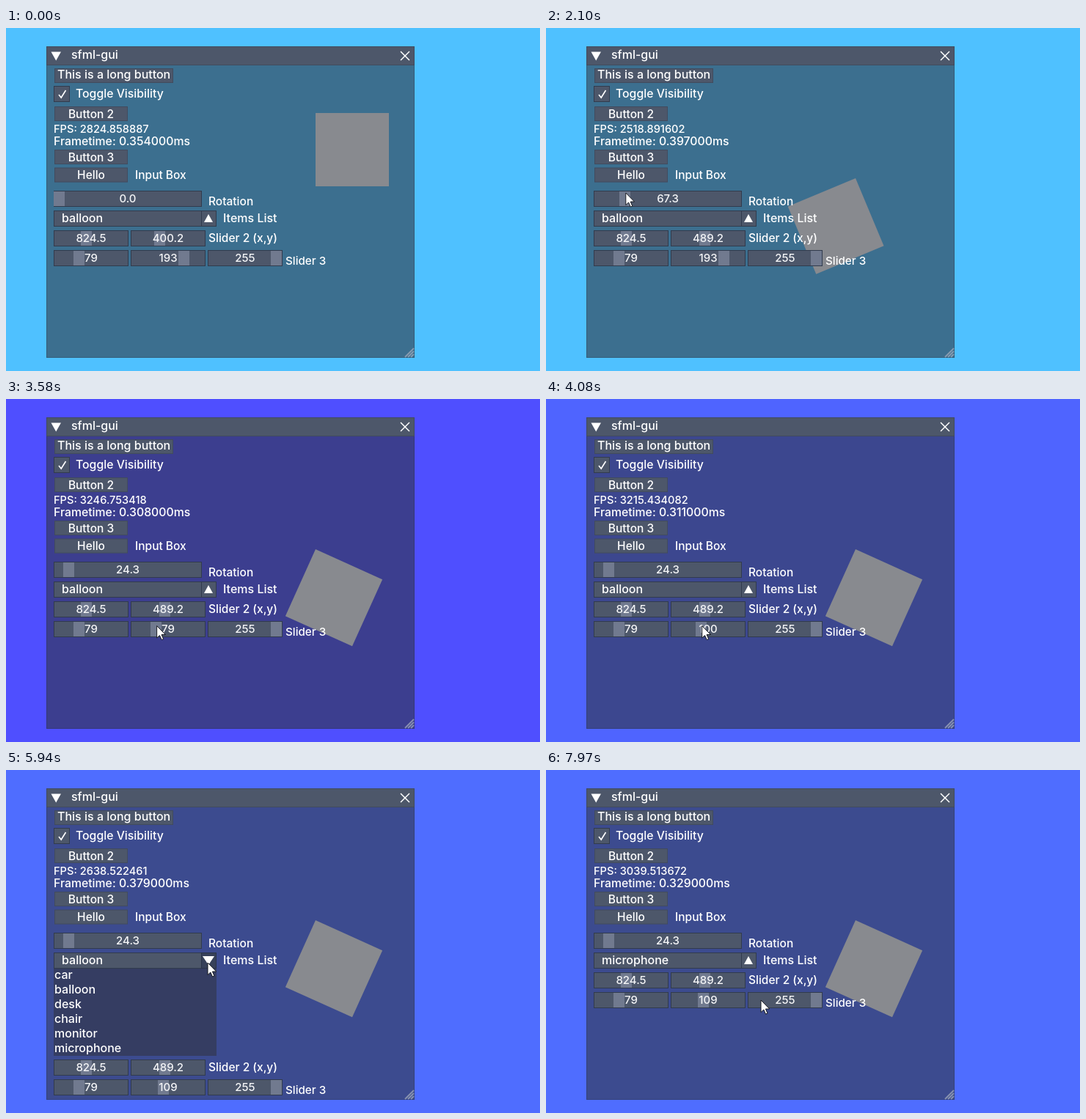
An HTML page with a canvas for the animation above (8 s loop, 728x468 px).

```html
<!DOCTYPE html>
<html lang="en">
<head>
<meta charset="utf-8">
<title>sfml-gui</title>
<style>
  html, body { margin: 0; width: 100%; height: 100%; overflow: hidden; background: #4fc1ff; }
  canvas { display: block; }
</style>
</head>
<body>
<canvas id="stage" width="728" height="468"></canvas>
<script>
const ctx = document.getElementById('stage').getContext('2d');
const LOOP = 8000;
const WIDGET = '#4d576a';
const BORDER = 'rgba(38,48,66,.7)';
const FAINT = 'rgba(38,48,66,.3)';
const ITEMS = ['car', 'balloon', 'desk', 'chair', 'monitor', 'microphone'];

const ease = u => u * u * (3 - 2 * u);
const mix = (a, b, u) => a + (b - a) * u;

// Eased interpolation through [time, value] keys, constant outside them.
function track(keys, t) {
  const next = keys.findIndex(([time]) => time > t);
  if (next === 0) return keys[0][1];
  if (next < 0) return keys[keys.length - 1][1];
  const [[t0, v0], [t1, v1]] = keys.slice(next - 1, next + 1);
  return mix(v0, v1, ease((t - t0) / (t1 - t0)));
}

const posY = t => track([[820, 400.2], [1225, 590.8], [1580, 489.2]], t);
const rotation = t => track([[1950, 0], [2430, 287], [2530, 287], [2740, 133.3], [3000, 24.3]], t);
const green = t => track([[3300, 193], [3580, 79], [4080, 100], [4400, 109]], t);
const isOpen = t => (t >= 5780 && t < 6480) || (t >= 7000 && t < 7600);

// The pointer rests on, or drags, one thing at a time and glides in between.
const grip = (x, w, value, max) => x + 9 + (w - 16) * value / max;
const arrow = () => [275, 263];
const item = i => () => [200, 278 + 20 * i];
const HOLDS = [
  { from: 30, to: 30, at: () => [637, 468] },
  { from: 720, to: 1670, at: t => [grip(170, 102, posY(t), 1080), 284] },
  { from: 1900, to: 3060, at: t => [grip(65, 202, rotation(t), 360), 225] },
  { from: 3250, to: 4400, at: t => [grip(170, 102, green(t), 255), 309.5] },
  { from: 5600, to: 5970, at: arrow },
  { from: 6300, to: 6480, at: item(2) },
  { from: 6850, to: 7020, at: arrow },
  { from: 7310, to: 7600, at: item(5) },
  { from: 7950, to: LOOP, at: () => [293, 314] }
];

function pointerAt(t) {
  const i = HOLDS.findIndex(hold => t <= hold.to);
  const hold = HOLDS[i];
  if (t >= hold.from) return hold.at(t);
  const last = HOLDS[i - 1];
  const u = ease((t - last.to) / (hold.from - last.to));
  const a = last.at(last.to), b = hold.at(hold.from);
  return [mix(a[0], b[0], u), mix(a[1], b[1], u)];
}

function frameMicros(t) {
  const step = Math.floor(t / 36);
  return Math.round(354 + 48 * Math.sin(step * step * 1.7));
}

function text(s, x, y, size = 16, align = 'left', color = '#fff') {
  ctx.font = `500 ${size}px Inter, sans-serif`;
  ctx.textAlign = align;
  ctx.fillStyle = color;
  ctx.fillText(s, x, y);
}

function box(x, y, w, h, border = BORDER, fill = WIDGET) {
  ctx.fillStyle = fill;
  ctx.fillRect(x, y, w, h);
  ctx.strokeStyle = border;
  ctx.lineWidth = 1;
  ctx.strokeRect(x + .5, y + .5, w - 1, h - 1);
}

function shape(points, fill) {
  ctx.beginPath();
  points.forEach(([x, y]) => ctx.lineTo(x, y));
  ctx.closePath();
  ctx.fillStyle = fill;
  ctx.fill();
}

function line(points, width, color) {
  ctx.beginPath();
  points.forEach(([x, y]) => ctx.lineTo(x, y));
  ctx.lineWidth = width;
  ctx.strokeStyle = color;
  ctx.stroke();
}

function button(label, y) {
  box(66, y, 100, 20, FAINT);
  text(label, 116, y + 15.5, 15.5, 'center');
}

function slider(x, y, w, value, max, digits) {
  box(x, y, w, 22);
  ctx.fillStyle = '#717a8f';
  ctx.fillRect(Math.round(grip(x, w, value, max) - 9), y + 1, 15, 20);
  text(value.toFixed(digits), x + w / 2, y + 16, 15, 'center', '#f4f5f7');
}

function drawPointer([x, y]) {
  ctx.save();
  ctx.translate(x, y);
  shape([[0, 0], [0, 16.5], [3.8, 13], [6.5, 19], [9, 18], [6.4, 12], [11.7, 12]], '#fff');
  ctx.lineWidth = 1;
  ctx.strokeStyle = '#15181f';
  ctx.stroke();
  ctx.restore();
}

function drawSquare(y, degrees) {
  ctx.save();
  ctx.translate(422, Math.round(y));
  ctx.rotate(degrees * Math.PI / 180);
  ctx.fillStyle = '#fff';
  ctx.fillRect(0, 0, 100, 100);
  ctx.restore();
}

function drawWindow() {
  box(55, 25, 502, 425, FAINT, 'rgba(46,50,59,.57)');
  box(55, 25, 502, 26, FAINT);
  shape([[61.5, 32.5], [75, 32.5], [68.2, 44.5]], '#fff');
  text('sfml-gui', 89, 42);
  line([[538, 32], [550, 44]], 1.5, '#fff');
  line([[550, 32], [538, 44]], 1.5, '#fff');
  for (let d = 0; d < 12; d += 4) {
    line([[544 + d, 449], [556, 437 + d]], 2, 'rgba(160,170,185,.75)');
  }
}

function drawCombo(selected, open) {
  box(65, 249, 222, 22);
  box(266, 249, 21, 22, BORDER, open ? '#37415a' : WIDGET);
  text(selected, 76, 265);
  shape(open ? [[268, 254], [284, 254], [276, 266]]
             : [[270, 265], [282, 265], [276, 254]], '#fff');
  text('Items List', 296, 265);
  if (!open) return;
  ctx.fillStyle = 'rgba(50,55,75,.65)';
  ctx.fillRect(65, 271, 222, 119);
  ITEMS.forEach((name, i) => text(name, 66, 285 + 20 * i));
}

function drawStats(micros) {
  const fps = Math.fround(1 / Math.fround(micros / 1e6));
  text('FPS: ' + fps.toFixed(6), 65, 143, 14.6);
  text(`Frametime: ${(micros / 1000).toFixed(6)}ms`, 65, 160, 15.8);
}

function draw(t) {
  const g = Math.round(green(t));
  const selected = t < 6480 ? 'balloon' : t < 7600 ? 'desk' : 'microphone';
  const shift = isOpen(t) ? 119 : 0;

  ctx.fillStyle = `rgb(79,${g},255)`;
  ctx.fillRect(0, 0, 728, 468);
  drawSquare(posY(t) - 284, rotation(t));
  drawWindow();

  box(66, 55, 162, 20, FAINT);
  text('This is a long button', 70, 69);
  box(65, 79, 22, 22);
  line([[72, 91], [75.2, 95], [81.5, 85]], 1.6, '#fff');
  text('Toggle Visibility', 95, 95, 15.8);
  button('Button 2', 107);
  drawStats(frameMicros(t));
  button('Button 3', 166);
  button('Hello', 190.5);
  text('Input Box', 176, 206, 15.5);
  slider(65, 222, 202, rotation(t), 360, 1);
  text('Rotation', 276, 242, 15.5);
  drawCombo(selected, isOpen(t));

  slider(65, 276 + shift, 102, 824.5, 1920, 1);
  slider(170, 276 + shift, 102, posY(t), 1080, 1);
  text('Slider 2 (x,y)', 276, 292 + shift, 15.5);
  [79, g, 255].forEach((value, i) => slider(65 + 105 * i, 303 + shift, 102, value, 255, 0));
  text('Slider 3', 381, 323 + shift, 15.2);

  if (t >= 30) drawPointer(pointerAt(t));
}

const start = performance.now();
function tick() {
  draw((performance.now() - start) % LOOP);
  requestAnimationFrame(tick);
}
tick();
</script>
</body>
</html>
```
